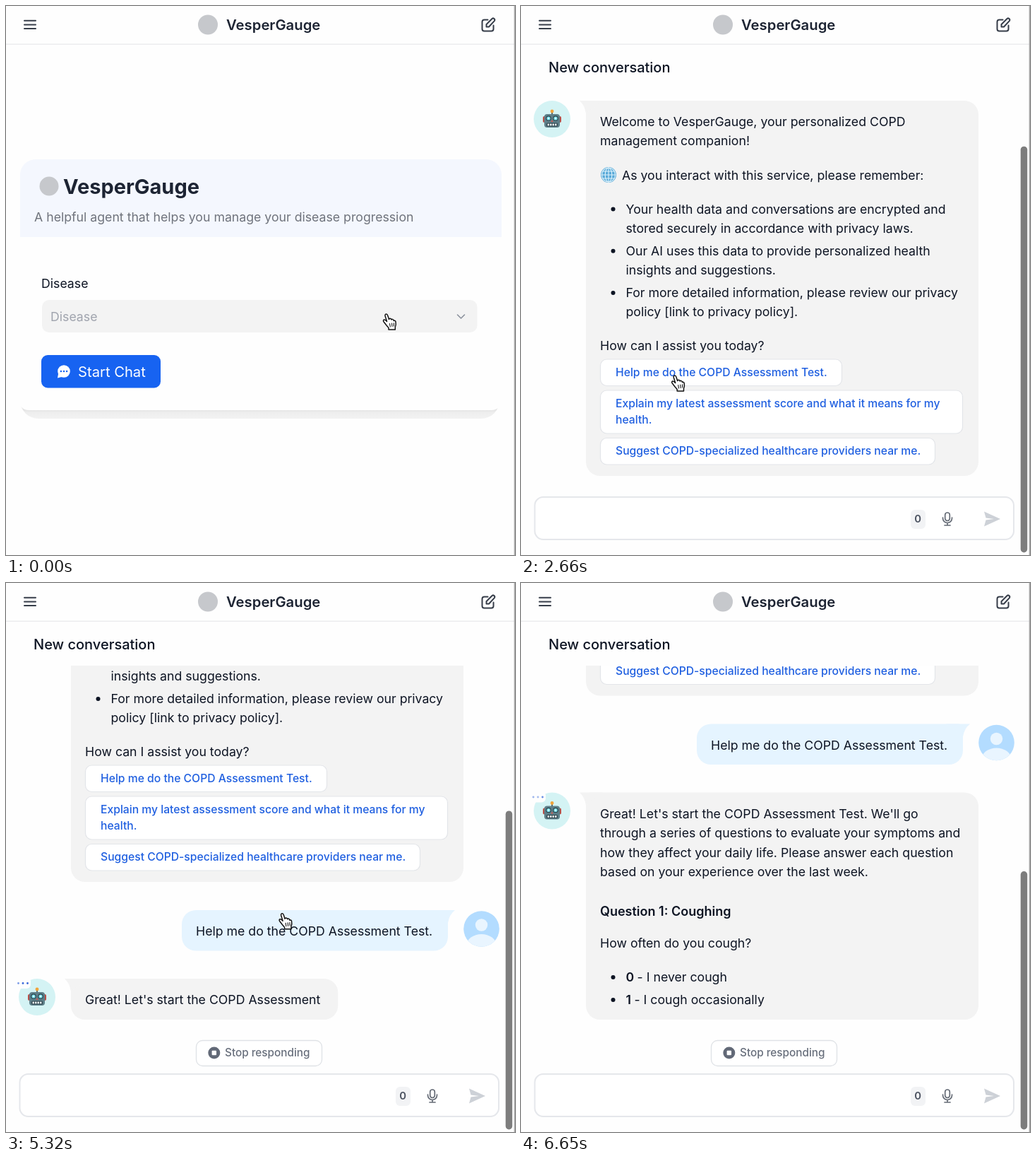
Write an HTML page with a canvas that moves like this. It is 721x777 px and loops after 6720 ms.

```html
<!DOCTYPE html>
<html lang="en">
<head>
<meta charset="utf-8">
<title>Health chat</title>
<style>
html, body { margin: 0; width: 100%; height: 100%; overflow: hidden; background: #fefefe; }
canvas { display: block; }
</style>
</head>
<body>
<canvas id="stage" width="721" height="777"></canvas>
<script>
const ctx = document.getElementById('stage').getContext('2d');
const LOOP = 6720, STEP = 70;
const CHAT_OPEN = 2590, SELECTED = 1330, SENT = 4550;
const APP = 'VesperGauge';
const BODY = 17.7;
const INK = '#0d1423', LINK = '#1f5fe0', GRAY = '#f3f3f3', LINE = '#e5e7eb', ICON = '#363d49';

// Pointer centre over time.
const POINTER = [
  [0, 543, 447], [490, 543, 447], [1050, 410, 503], [1400, 410, 503], [1820, 206, 535],
  [2590, 206, 535], [3430, 400, 523], [3990, 400, 523], [4550, 397, 525], [5180, 397, 525],
  [5670, 392, 363], [6160, 272, 33], [6300, 235, -30]
];
const ARROW_FROM = 5810;

// Number of streamed words over time.
const STREAM = [[5180, 0], [5670, 21], [6160, 40], [6650, 56]];

// dy: text centre below the bubble top; pad: space under it when it is the last line.
const ANSWER = [
  { dy: 30, text: "Great! Let's start the COPD Assessment Test. We'll go" },
  { dy: 57.5, text: 'through a series of questions to evaluate your symptoms and' },
  { dy: 85, text: 'how they affect your daily life. Please answer each question' },
  { dy: 112, text: 'based on your experience over the last week.' },
  { dy: 168, text: 'Question 1: Cough~ing', bold: true, pad: 24.5 },
  { dy: 213.5, text: 'How often do you cough?' },
  { dy: 261.5, text: '0 - I never cough', item: true },
  { dy: 293.5, text: '1 - I cough occasionally', item: true }
].map(l => ({ pad: 28, ...l, words: l.text.match(/~?[^\s~]+ */g).map(w => w.replace('~', '')) }));

function track(keys, t) {
  let i = 0;
  while (i < keys.length - 2 && t >= keys[i + 1][0]) i++;
  const a = keys[i], b = keys[i + 1];
  const k = Math.min(1, Math.max(0, (t - a[0]) / (b[0] - a[0])));
  return a.slice(1).map((v, n) => v + (b[n + 1] - v) * k);
}

function setFont(size, weight = 400) {
  ctx.font = `${weight} ${size}px Inter, "Liberation Sans", sans-serif`;
}

function text(s, x, y, size = BODY, weight = 400, color = INK) {
  setFont(size, weight);
  ctx.fillStyle = color;
  ctx.fillText(s, x, y + size * 0.35);
  return ctx.measureText(s).width;
}

function box(x, y, w, h, r, fill, stroke, lw = 1) {
  ctx.beginPath();
  ctx.roundRect(x, y, w, h, r);
  if (fill) { ctx.fillStyle = fill; ctx.fill(); }
  if (stroke) { ctx.strokeStyle = stroke; ctx.lineWidth = lw; ctx.stroke(); }
}

function oval(x, y, rx, ry, fill) {
  ctx.beginPath();
  ctx.ellipse(x, y, rx, ry, 0, 0, Math.PI * 2);
  ctx.fillStyle = fill;
  ctx.fill();
}

function disc(x, y, r, fill) {
  oval(x, y, r, r, fill);
}

function dots(x, y, gap, r, color) {
  for (let i = -1; i < 2; i++) disc(x + i * gap, y, r, color);
}

// Draws SVG path data with its origin at x, y.
function shape(d, x, y, fill, stroke, lw = 2) {
  const p = new Path2D(d);
  ctx.save();
  ctx.translate(x, y);
  ctx.lineJoin = ctx.lineCap = 'round';
  if (fill) { ctx.fillStyle = fill; ctx.fill(p); }
  if (stroke) { ctx.strokeStyle = stroke; ctx.lineWidth = lw; ctx.stroke(p); }
  ctx.restore();
}

function header() {
  box(0, 0, 721, 54, 0, '#fefefe');
  box(0, 53.5, 721, 1.2, 0, '#e8e9eb');
  shape('M1 0H17M1 5.7H17M1 11.4H17', 25, 20.7, null, ICON, 2);
  disc(286, 26.5, 14, '#c6c8cc');
  text(APP, 312, 26.5, 20.3, 600, '#1d2433');
  shape('M8 2H3Q0 2 0 5V15Q0 18 3 18H13Q16 18 16 15V10M6 12V8.500L14 .5Q15.500 -.8 17 .6Q18.500 2 17.300 3.600L9.500 12Z',
    674.5, 17.5, null, ICON, 2);
}

function formPage(t) {
  const g = ctx.createLinearGradient(0, 571, 0, 585);
  g.addColorStop(0, '#e2e2e2');
  g.addColorStop(0.3, '#eeeeee');
  g.addColorStop(1, '#f3f3f3');
  box(20, 500, 679, 84, 26, g);
  box(18, 480, 684, 92, [0, 0, 14, 14], '#fefefe');
  box(20, 217, 682, 110, [22, 22, 0, 0], '#f4f7fe');
  disc(61, 255, 13.5, '#c6c8cc');
  text(APP, 81, 255.5, 29, 700, '#1d2433');
  text('A helpful agent that helps you manage your disease progression', 40, 299, BODY, 400, '#6f737c');

  text('Disease', 50, 392.5);
  box(51, 416, 616.5, 46, 10, GRAY);
  if (t >= SELECTED) text('Chronic obstructive pulmonary disease', 63, 439.5);
  else text('Disease', 63, 439.5, BODY, 400, '#a0a4ae');
  shape('M0 0L5 5L10 0', 639.5, 437, null, '#8b919d', 1.6);

  box(50, 494, 169, 46.5, 9, '#1763f1');
  disc(82, 517, 8.8, '#fff');
  shape('M0 0L-1.500 8.500L8 6Z', 74.5, 518, '#fff');
  dots(82, 517, 4.1, 1.3, '#1763f1');
  text('Start Chat', 102, 517.5, 20.2, 400, '#fff');
}

function robot(y) {
  disc(44, y, 26, '#d4f3f4');
  box(43, y - 11, 2, 5, 0, '#56656c');
  disc(44, y - 11, 2.4, '#f0a43c');
  box(31, y - 4, 4, 9, 2, '#b94f48');
  box(53, y - 4, 4, 9, 2, '#b94f48');
  box(33, y - 7, 22, 19, 4, '#5d7f89');
  for (const x of [39, 49]) {
    disc(x, y - 1, 3.8, '#2e444d');
    disc(x, y - 1, 2.6, '#79e3ee');
    disc(x, y - 1, 1, '#fff');
  }
  shape('M0 -2L1.500 1H-1.500Z', 44, y + 3, '#d4564f');
  box(36, y + 5.5, 16, 5, 1.5, '#2e444d');
  for (let i = 0; i < 4; i++) box(37.5 + i * 3.5, y + 6.6, 2.5, 2.8, 0, '#e8eff0');
}

function person(y) {
  ctx.save();
  ctx.beginPath();
  ctx.arc(673.5, y, 25.3, 0, Math.PI * 2);
  ctx.clip();
  box(648, y - 26, 52, 52, 0, '#b3dcff');
  disc(673.5, y - 5.5, 8.7, '#e9f5ff');
  oval(673.5, y + 23, 21, 15.5, '#e9f5ff');
  ctx.restore();
}

function globe(x, y) {
  disc(x, y, 11, '#58a9d8');
  ctx.strokeStyle = '#e0f3fb';
  ctx.lineWidth = 1.1;
  for (const rx of [4.8, 9.5]) {
    ctx.beginPath();
    ctx.ellipse(x, y, rx, 10, 0, 0, Math.PI * 2);
    ctx.stroke();
  }
  shape('M0 -10V10M-10 0H10M-8.500 -5H8.500M-8.500 5H8.500', x, y, null, '#e0f3fb', 1.1);
}

function bubble(x, y, w, h, fill, right) {
  box(x, y, w, h, right ? [20, 6, 20, 20] : [6, 20, 20, 20], fill);
  if (right) shape('M-24 0H10Q2 6 0 18Z', x + w, y, fill);
  else shape('M24 0H-9Q-2 6 0 18Z', x, y, fill);
}

function reply(y, w, h, lines) {
  box(112.5, y, w, h, 9, '#fff', '#e3e5e9', 1.2);
  lines.forEach((s, i) => text(s, 134, y + 18.5 + i * 23.5, 15.7, 500, LINK));
}

function welcome(y) {
  robot(y + 26);
  bubble(92, y, 556, 531, GRAY);
  text(`Welcome to ${APP}, your personalized COPD`, 112, y + 30);
  text('management companion!', 112, y + 57);
  globe(124, y + 105);
  text('As you interact with this service, please remember:', 143, y + 105.5);
  const list = [
    'Your health data and conversations are encrypted and',
    'stored securely in accordance with privacy laws.',
    'Our AI uses this data to provide personalized health',
    'insights and suggestions.',
    'For more detailed information, please review our privacy',
    'policy [link to privacy policy].'
  ];
  list.forEach((s, i) => {
    const ly = y + 153.5 + (i >> 1) * 59.2 + (i % 2) * 27.2;
    if (i % 2 === 0) disc(130.5, ly, 3, INK);
    text(s, 148.5, ly);
  });
  text('How can I assist you today?', 112, y + 347);
  reply(y + 366, 342, 37.5, ['Help me do the COPD Assessment Test.']);
  reply(y + 410, 513, 61, ['Explain my latest assessment score and what it means for my', 'health.']);
  reply(y + 477.5, 474, 37.5, ['Suggest COPD-specialized healthcare providers near me.']);
}

// Lines of the answer cut to the first n words.
function visibleLines(n) {
  const out = [];
  for (const line of ANSWER) {
    if (n <= 0) break;
    out.push({ ...line, words: line.words.slice(0, n) });
    n -= line.words.length;
  }
  return out;
}

function answer(y, h, lines, t) {
  robot(y + 26);
  box(14, y - 2, 21, 16, 6, '#fefefe');
  for (let i = 0; i < 3; i++) {
    ctx.globalAlpha = 0.7 + 0.3 * Math.cos(t / 160 - i * 1.2);
    disc(17.5 + i * 6.5, y + 6.5, 1.4, '#2f62d9');
  }
  ctx.globalAlpha = 1;
  if (!lines.length) {
    bubble(92, y, 72, h, GRAY);
    dots(127, y + 29, 8.7, 2.7, '#6a6a70');
    return;
  }
  setFont(BODY);
  const wide = lines.length > 1 ? 556 : 40 + ctx.measureText(lines[0].words.join('')).width;
  bubble(92, y, Math.min(556, wide), h, GRAY);
  for (const { dy, words, bold, item } of lines) {
    const ly = y + dy;
    if (item) {
      disc(130.5, ly, 3, INK);
      const w = text(words[0], 148.5, ly, BODY, 600);
      text(words.slice(1).join(''), 148.5 + w, ly);
    } else if (bold) text(words.join(''), 112, ly, 18, 600);
    else text(words.join(''), 112, ly);
  }
}

function composer() {
  box(19.5, 695, 678.5, 60, 12, '#fff', LINE, 2);
  box(552, 713, 21, 27, 6, '#f2f3f5');
  text('0', 557.3, 726.3, 14.8, 600, '#4b5260');
  box(600.7, 717, 6.6, 11.5, 3.3, null, '#656b76', 1.7);
  shape('M-6.500 0V1A6.500 6.500 0 0 0 6.500 1V0M0 8V11M-4 11H4', 604, 724, null, '#656b76', 1.7);
  shape('M0 0L23 10.500L0 21L2.500 12L14 10.500L2.500 9Z', 656, 715.5, '#cdd1d7');
}

function stopButton() {
  box(269.5, 647.5, 178, 36, 9, '#fff', '#dfe2e6', 1.3);
  disc(294.8, 665, 8.5, '#626977');
  box(291.6, 661.8, 6.4, 6.4, 1, '#fff');
  text('Stop responding', 310, 665, 15.3, 500, '#676e7b');
}

function chatPage(t) {
  const sent = t >= SENT;
  const lines = visibleLines(Math.round(track(STREAM, t)[0]));
  const last = lines[lines.length - 1];
  const h = last ? last.dy + last.pad : 57;
  const top = sent ? 618 - h : 802;

  ctx.save();
  ctx.beginPath();
  ctx.rect(0, 117, 706, 577);
  ctx.clip();
  welcome(top - 668);
  if (sent) {
    bubble(249, top - 97, 377, 57.5, '#e5f4ff', true);
    text('Help me do the COPD Assessment Test.', 269, top - 67);
    person(top - 70.5);
    answer(top, h, lines, t);
  }
  ctx.restore();

  text('New conversation', 39, 86.5, 20, 500);
  if (sent) stopButton();
  composer();
  const thumb = 507000 / (882 + 802 - top);
  box(707.7, 773.5 - thumb, 9.5, thumb, 4.7, '#7d7d7d');
}

function pointer(t) {
  const [x, y] = track(POINTER, t);
  if (t >= ARROW_FROM) {
    shape('M0 0V18.500L4.300 14.500L7.300 21.500L10.500 20L7.500 13.300H13.300Z', x - 4.5, y - 10.5, '#000', '#fff', 1.3);
    return;
  }
  shape('M-4 5L-7.500 .5Q-9.500 -2 -7.500 -3Q-6 -3.500 -3.500 -.5L-6 -8.500Q-6.200 -11 -4.300 -11Q-2.800 -11 -2.300 -9L-.5 -3.500' +
    'Q.5 -5.500 2.500 -4.200L3 -3Q4.500 -4.500 6 -2.500L6.300 -1.500Q8.500 -2.500 9 0Q9.800 4 8.300 7.500V11H-1V8.500Z',
    x, y, '#fff', '#111', 1.5);
  shape('M.5 2.500L1.300 7M3.500 2L4 6.500M6.300 1.800L6.500 6', x, y, null, '#111', 1.1);
}

function frame(now) {
  const t = Math.floor((now % LOOP) / STEP) * STEP;
  box(0, 0, 721, 777, 0, '#fefefe');
  if (t < CHAT_OPEN) formPage(t);
  else chatPage(t);
  header();
  box(719.7, 0, 1.3, 777, 0, '#a6a6a6');
  pointer(t);
}

const start = performance.now();
function tick() {
  frame(performance.now() - start);
  requestAnimationFrame(tick);
}
tick();
</script>
</body>
</html>
```
